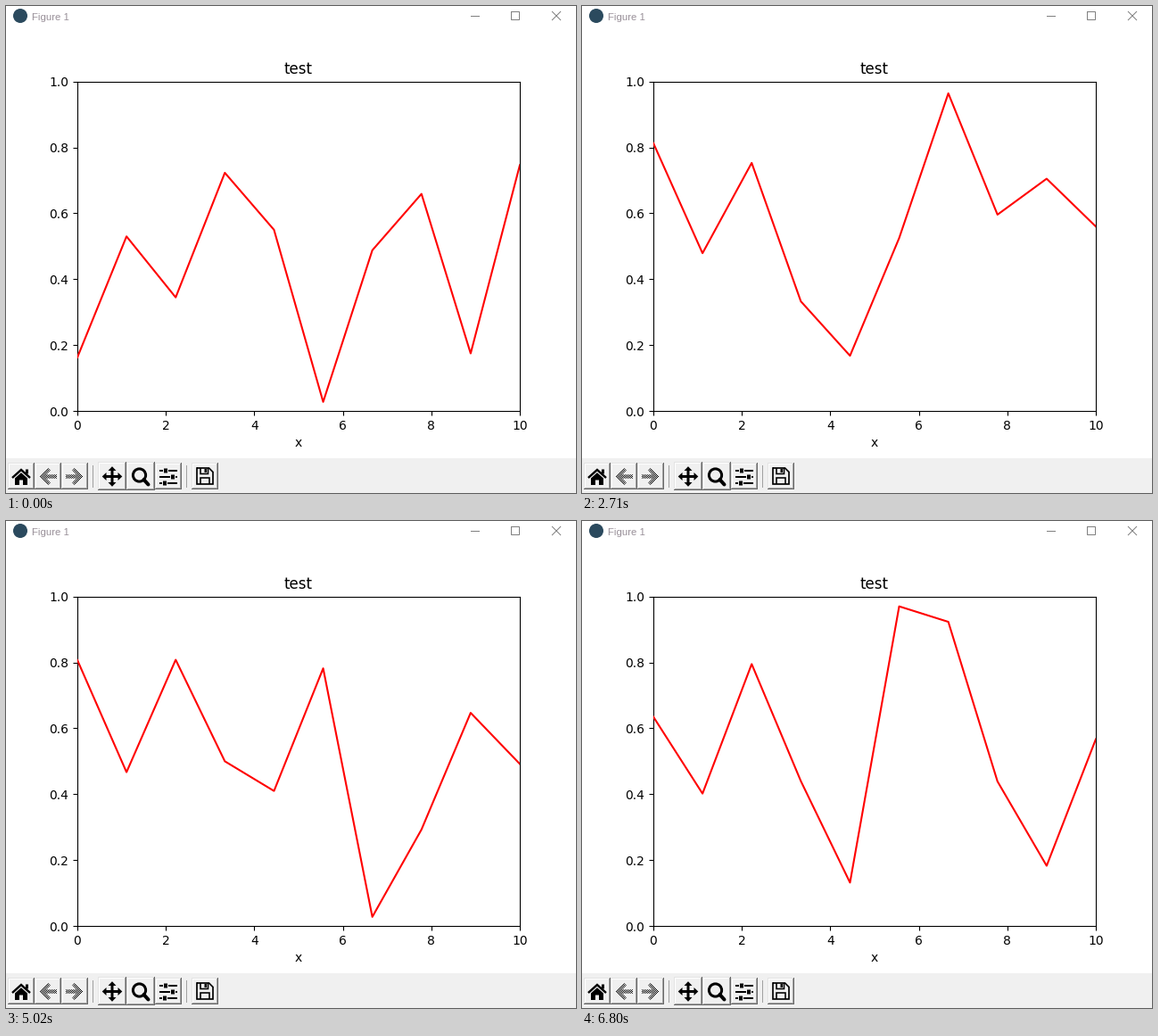
A matplotlib script for the animation above (6.9 s loop, 639 by 546 pixels).

```python
import numpy as np
import matplotlib.pyplot as plt
from matplotlib.animation import FuncAnimation
from matplotlib.patches import Circle, Polygon

W, H, DPI = 639, 546, 100
LOOP, INTERVAL = 6900, 30
WINDOW = 10
TICK = 135.8  # ms between redraws

# The plotted stream; the chart shows a sliding window over it.
SAMPLES = np.array([
    .163, .53, .345, .723, .55, .028, .488, .659, .175, .746, .013, .612,
    .758, .69, .342, .843, .604, .813, .479, .753, .333, .168, .525, .964,
    .596, .705, .56, .498, .41, .678, .175, .807, .467, .808, .5, .41,
    .782, .028, .293, .647, .492, .635, .402, .795, .44, .132, .97, .923,
    .439, .183, .567])

# Redraws at which no new sample had come in.
IDLE_TICKS = [6, 10, 14, 21, 26, 31, 38, 43, 49]

fig = plt.figure(figsize=(W / DPI, H / DPI), dpi=DPI, facecolor="white")

# Window layer in pixel coordinates, y pointing down.
win = fig.add_axes([0, 0, 1, 1])
win.axis("off")


def poly(points, color="black"):
    return win.add_patch(Polygon(points, closed=True, fc=color, ec="none",
                                 lw=0, snap=False))


def rect(x, y, w, h, color="black"):
    poly([(x, y), (x + w, y), (x + w, y + h), (x, y + h)], color)


def stroke(points, width, color="black", cap="butt"):
    xs, ys = zip(*points)
    win.plot(xs, ys, color=color, lw=width * 72 / DPI, snap=False,
             solid_capstyle=cap, solid_joinstyle="miter")


def frame_box(x, y, size, width, color):
    stroke([(x, y), (x + size, y), (x + size, y + size), (x, y + size),
            (x, y - width / 2)], width, color)


def title_bar():
    gray = "#808080"
    win.add_patch(Circle((16, 11), 8, fc="#2b4a5e", ec="none"))
    win.text(29, 16, "Figure 1", color="#999099", fontsize=8.2,
             family="Liberation Sans", va="baseline")
    stroke([(521, 11.5), (531, 11.5)], 1, gray)
    frame_box(566.5, 6.5, 9, 1, gray)
    stroke([(612, 6), (622, 16)], 1, gray)
    stroke([(612, 16), (622, 6)], 1, gray)


def button(cx, size=30):
    x, y = cx - size / 2, 527 - size / 2
    rect(x, y, size, size, "#696969")
    rect(x, y, size - 1, size - 1, "#e3e3e3")
    rect(x + 1, y + 1, size - 2, size - 2, "#a0a0a0")
    rect(x + 1, y + 1, size - 3, size - 3, "white")
    rect(x + 2, y + 2, size - 4, size - 4, "#f0f0f0")


def home(cx):
    stroke([(cx - 10, 529), (cx, 520), (cx + 10, 529)], 2.4)
    rect(cx + 5, 519.5, 3, 5)
    half = [(0, 523.2), (7, 529.5), (7, 537), (2, 537), (2, 531.5)]
    poly([(cx + dx, y) for dx, y in half]
         + [(cx - dx, y) for dx, y in reversed(half)])


def stippled_arrow(cx, side):
    """Disabled arrow: a checkerboard clipped to the arrow shape."""
    half = [(-10, 0), (-.3, -9.5), (2.3, -7), (-2.5, -2.2), (9.5, -2.2)]
    shape = half + [(dx, -dy) for dx, dy in reversed(half[1:])]
    clip = poly([(cx + side * dx, 527.5 + dy) for dx, dy in shape], "none")
    n = 24
    rows, cols = np.indices((n, n))
    checker = np.zeros((n, n, 4))
    checker[..., 3] = (rows + cols) % 2
    left, top = int(cx) - n // 2, 527 - n // 2
    image = win.imshow(checker, extent=(left, left + n, top + n, top),
                       interpolation="nearest", aspect="auto", zorder=3)
    image.set_clip_path(clip)


def move(cx, cy=527.5):
    rect(cx - 8, cy - 1.5, 16, 3)
    rect(cx - 1.5, cy - 8, 3, 16)
    head = [(11.3, 0), (6.5, -4.5), (6.5, 4.5)]
    for c, s in [(1, 0), (0, 1), (-1, 0), (0, -1)]:
        poly([(cx + c * u - s * v, cy + s * u + c * v) for u, v in head])


def magnifier(cx, cy=526):
    win.add_patch(Circle((cx, cy), 7.1, fc="none", ec="black",
                         lw=3 * 72 / DPI))
    stroke([(cx + 5, cy + 5), (cx + 10, cy + 10.5)], 4, cap="round")


def sliders(cx):
    for y, knob in [(521, -3), (528, 5), (535, -4)]:
        rect(cx - 10, y - 1, 20, 2)
        rect(cx + knob - 3, y - 1, 6, 2, "#f0f0f0")
        rect(cx + knob - 2, y - 2.5, 4, 5)


def floppy(cx, y=518):
    x = cx - 9
    stroke([(x, y), (x + 13.5, y), (x + 18, y + 4.5), (x + 18, y + 18),
            (x, y + 18), (x, y - .8)], 1.7)
    for edge, depth, right in [(y, 6.5, 12.5), (y + 18, -7, 14)]:
        stroke([(x + 4, edge), (x + 4, edge + depth),
                (x + right, edge + depth), (x + right, edge)], 1.6)
    rect(x + 8.5, y + 1, 2.5, 4)


def toolbar():
    rect(0, 507, W, H - 507, "#f0f0f0")
    for cx in (17, 47, 77, 182, 223):
        button(cx)
    for cx in (119, 151):
        button(cx, 32)
    for x in (97, 202):
        rect(x, 515, 1, 25, "#a0a0a0")
    home(17)
    stippled_arrow(47.5, 1)
    stippled_arrow(76.5, -1)
    move(119)
    magnifier(149.5)
    sliders(182)
    floppy(223)


title_bar()
toolbar()
win.set(xlim=(0, W), ylim=(H, 0))

ax = fig.add_axes([80 / W, 91.8 / H, 496 / W, 369.6 / H])
ax.set(xlim=(0, 10), ylim=(0, 1), title="test", xlabel="x")
# The curve lies over the axes frame.
line, = ax.plot(np.linspace(0, 10, WINDOW), SAMPLES[:WINDOW], "r-",
                lw=1.5, zorder=3)


def update(frame):
    tick = int((frame + 1.5) * INTERVAL / TICK)
    shift = tick - sum(idle <= tick for idle in IDLE_TICKS)
    line.set_ydata(SAMPLES[shift:shift + WINDOW])
    return line,


anim = FuncAnimation(fig, update, frames=LOOP // INTERVAL,
                     interval=INTERVAL, repeat=True, repeat_delay=0)
plt.show()
```
